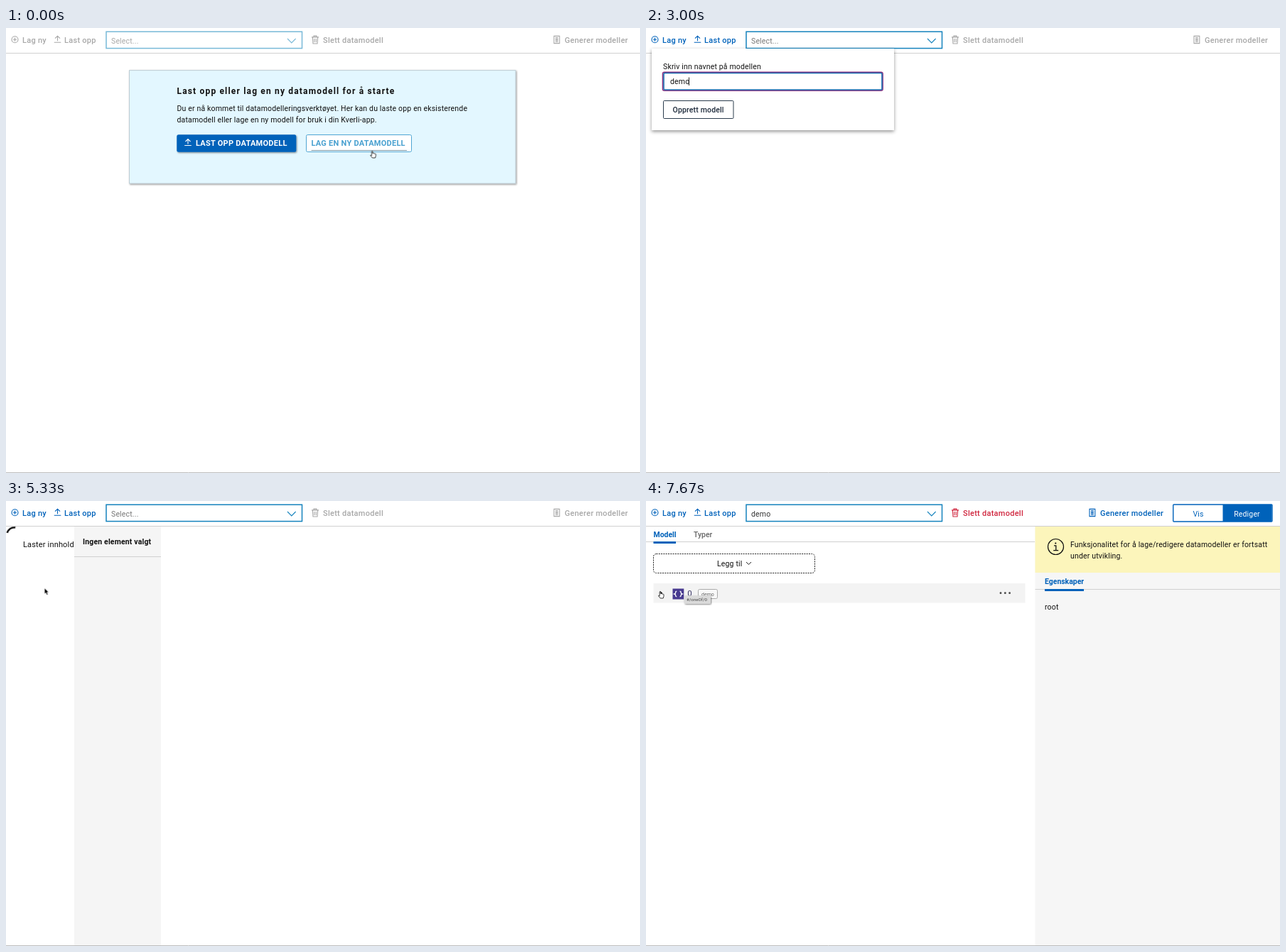
Animation, 892 px wide and 627 px high, one loop 8 s. Source, as an HTML page:

```html
<!DOCTYPE html>
<html lang="nb">
<head>
<meta charset="utf-8">
<title>Datamodellering</title>
<style>
  html, body { margin: 0; width: 100%; height: 100%; overflow: hidden; background: #fff; }
  svg { display: block; width: 100%; height: 100%; }
  text { font: 10.5px Roboto, sans-serif; letter-spacing: .16px; fill: #111; white-space: pre; }
  .bar text { font-size: 11px; font-weight: 500; letter-spacing: .26px; fill: currentColor; }
  .icon { fill: none; stroke: currentColor; stroke-width: 1.1; }
  .caps { font-size: 11px; font-weight: 700; letter-spacing: .25px; }
  .tab { font-weight: 700; letter-spacing: -.03px; }
  .blue { fill: #0062ba; }
  .white { fill: #fff; }
  .rule { stroke: #d0d0d0; }
  .mid { text-anchor: middle; }
  .cursor { opacity: 0; }
</style>
</head>
<body>
<svg viewBox="0 0 892 627">
  <defs>
    <filter id="soft" x="-10%" y="-10%" width="120%" height="130%">
      <feDropShadow dx="0" dy="2" stdDeviation="2.4" flood-opacity=".42"/>
    </filter>
    <filter id="edge" x="-5%" y="-5%" width="110%" height="125%">
      <feDropShadow dx="1" dy="1.2" stdDeviation=".8" flood-opacity=".45"/>
    </filter>
    <path id="upload" class="icon" d="M0 7.5V.8M-3.5 4L0 .6L3.5 4M-4.8 9.5H4.8"/>
  </defs>

  <path class="rule" d="M0 35.5H892"/>

  <g id="loading">
    <rect x="96" y="36" width="122" height="590" fill="#f5f5f5"/>
    <path class="rule" d="M96 78.5H218"/>
    <text x="24" y="64.5" style="font-size:11px">Laster innhold</text>
    <text x="108" y="60.5" style="font-weight:700">Ingen element valgt</text>
    <circle id="spinner" r="10.9" fill="none" stroke="#000" stroke-width="2.3"/>
  </g>

  <g id="editor">
    <path class="rule" d="M0 57.5H547"/>
    <text class="tab blue" x="10.5" y="50.5">Modell</text>
    <text class="tab" x="67" y="50.5" fill="#666" style="fill:#666;font-weight:500">Typer</text>
    <rect class="blue" x="10.5" y="57" width="31.5" height="3"/>
    <rect x="10.5" y="74.5" width="227" height="27" rx="4" fill="none" stroke="#222" stroke-dasharray="2 1.3"/>
    <text x="100" y="92">Legg til</text>
    <path d="M141 86l3.5 3.5L148 86" fill="none" stroke="#222"/>

    <rect x="10.5" y="116" width="523" height="27.5" fill="#f3f3f3"/>
    <path d="M19.7 126.8l3.6 2.9l-3.6 2.9z"/>
    <rect x="37.5" y="123.5" width="15.8" height="15" fill="#483a90"/>
    <path d="M43.2 127.3q-1.6 0-1.6 1.6t-1.6 2.1q1.6.5 1.6 2.1t1.6 1.6M47.6 127.3q1.6 0 1.6 1.6t1.6 2.1q-1.6.5-1.6 2.1t-1.6 1.6" fill="none" stroke="#fff" stroke-width="1.4"/>
    <text x="58.3" y="133.8" style="font-size:11.5px;fill:#3c3868">0</text>
    <rect x="73.5" y="124.5" width="27" height="13" rx="2" fill="#f8f8f8" stroke="#aaa"/>
    <text x="78" y="133.6" style="font-size:7px;letter-spacing:0;fill:#666">demo</text>
    <g fill="#444"><circle cx="499" cy="129.7" r="1.4"/><circle cx="505.3" cy="129.7" r="1.4"/><circle cx="511.6" cy="129.7" r="1.4"/></g>

    <rect x="547.5" y="36" width="344.5" height="590" fill="#f6f6f6"/>
    <rect x="547.5" y="36" width="344.5" height="65" fill="#fcf5bb"/>
    <circle cx="576.5" cy="64.5" r="11" fill="none" stroke="#111" stroke-width="1.2"/>
    <path d="M574 62.8h2.8v6.6M573.2 69.6h7" fill="none" stroke="#111" stroke-width="1.3"/>
    <circle cx="576.3" cy="59.5" r="1.1"/>
    <text x="597" y="64.5">Funksjonalitet for å lage/redigere datamodeller er fortsatt</text>
    <text x="597" y="81">under utvikling.</text>
    <path class="rule" d="M547.5 124.5H892"/>
    <text class="tab blue" x="561" y="117">Egenskaper</text>
    <rect class="blue" x="561" y="124" width="55" height="3"/>
    <text x="561" y="153">root</text>

    <rect x="741.7" y="5" width="139.3" height="24" rx="1" fill="#fff" stroke="#0062ba" stroke-width="1.4"/>
    <rect class="blue" x="811.5" y="5" width="69" height="24"/>
    <text class="mid blue" x="777" y="21.7">Vis</text>
    <text class="mid white" x="845.5" y="21.7">Rediger</text>
  </g>

  <g class="bar">
    <g id="create">
      <circle class="icon" cx="12.5" cy="16.3" r="4.5"/>
      <path class="icon" d="M10 16.3h5M12.5 13.8v5"/>
      <text x="23" y="20.6">Lag ny</text>
      <use href="#upload" x="72.5" y="10.7"/>
      <text x="82" y="20.6">Last opp</text>
    </g>
    <g id="remove">
      <path class="icon" d="M430 12.9h10M433 12.6v-1.5h4v1.5M431.3 13l.7 9h6l.7-9M433.8 15v5M436.2 15v5"/>
      <text x="446" y="20.6">Slett datamodell</text>
    </g>
    <g id="generate">
      <path class="icon" d="M771 11.4h7.8v10.2H771zM773 13.6h3.8M773 15.6h3.8M773 17.4h3.8M773 19.4h3.8"/>
      <text x="786" y="20.6">Generer modeller</text>
    </g>
  </g>

  <g id="select">
    <rect x="141" y="5.2" width="275.5" height="23.4" fill="#fff" stroke="currentColor" stroke-width="1.5"/>
    <path class="icon" d="M396 15l5.8 6l5.8-6"/>
    <text id="placeholder" x="148" y="22" style="fill:currentColor">Select...</text>
    <text id="chosen" x="148" y="22" style="fill:#333">demo</text>
  </g>

  <g id="dialog">
    <rect x="173.5" y="59.7" width="543.5" height="159.3" fill="#e3f7ff" stroke="#b4c3ca" stroke-width=".8" filter="url(#edge)"/>
    <text x="240.5" y="93" style="font-size:12px;font-weight:700;letter-spacing:1.17px">Last opp eller lag en ny datamodell for å starte</text>
    <text x="240.5" y="117">Du er nå kommet til datamodelleringsverktøyet. Her kan du laste opp en eksisterende</text>
    <text x="240.5" y="133.3">datamodell eller lage en ny modell for bruk i din Kverli-app.</text>
    <rect class="blue" x="240.3" y="150.2" width="168" height="24.6" rx="2.5" filter="url(#edge)"/>
    <use href="#upload" x="256" y="156" color="#fff"/>
    <text class="caps white" x="267" y="166">LAST OPP DATAMODELL</text>
    <rect x="422.5" y="150.5" width="148" height="24" rx="2" fill="#fff" stroke="#4fa5d3"/>
    <text class="caps" x="429.5" y="165.6" style="fill:#48a0d0">LAG EN NY DATAMODELL</text>
    <path d="M429.5 172.5H564" stroke="#7797a8"/>
  </g>

  <g id="popup">
    <rect x="8" y="29" width="341" height="115" fill="#fff" filter="url(#soft)"/>
    <text x="24" y="58.3">Skriv inn navnet på modellen</text>
    <rect id="ring" x="23.4" y="62.3" width="309.8" height="26" rx="2.5" fill="none" stroke="#8d2f7f" stroke-width="1.4"/>
    <rect id="field" x="25" y="63.5" width="307" height="23.5" rx="1.5" fill="#fff" stroke-width="1.6"/>
    <text id="hint" x="34" y="78.8" style="fill:#6c6c6c">Navn</text>
    <text id="typed" x="34" y="78.8">demo</text>
    <path id="caret" d="M.5 69.5v11.5" stroke="#111" stroke-width=".9"/>
    <rect id="submit" x="24.5" y="102.5" width="98.5" height="25" rx="1.2" stroke="#2b3c4d"/>
    <text x="37.5" y="119" style="font-weight:500;fill:#1e2b3c">Opprett modell</text>
  </g>

  <g id="tip">
    <rect x="53.5" y="133.2" width="37.5" height="11.5" rx="2" fill="#dadada" filter="url(#edge)"/>
    <text x="57" y="141.2" style="font-size:6.2px;letter-spacing:0;fill:#444">#/oneOf/0</text>
  </g>

  <path class="rule" d="M0 626.5H892" style="stroke:#bdbdbd"/>

  <path id="arrow" class="cursor" d="M0 0v8l1.8-1.6l1.4 3l1.5-.7l-1.4-2.9h2.4z" stroke="#fff" stroke-width=".5"/>
  <path id="hand" class="cursor" d="M2.2 5.8V1q.8-1 1.6 0v2.7q.9-.7 1.5.2q.9-.5 1.4.3q1-.3 1.3.6v2.4L7.2 10H3.2L.5 6.7q0-1.4 1.7 0z" fill="#fff" stroke="#222" stroke-width=".9"/>
  <path id="beam" class="cursor" d="M-1.8-4q1.8 0 1.8 1q0-1 1.8-1M0-3v6M-1.8 4q1.8 0 1.8-1q0 1 1.8 1" fill="none" stroke="#111" stroke-width=".9"/>
</svg>

<script>
const LOOP = 8000;

// Each step is [time in ms, value], held until the next one.
function hold(id, property, steps) {
  const frames = steps.map(([time, value]) =>
    ({ offset: time / LOOP, [property]: value, easing: 'step-end' }));
  frames.push({ ...frames[frames.length - 1], offset: 1 });
  document.getElementById(id).animate(frames, { duration: LOOP, iterations: Infinity });
}

const show = (id, ...steps) => hold(id, 'opacity', [[0, 0], ...steps]);
const during = (id, from, to) => show(id, [from, 1], [to, 0]);
const move = (x, y = 0) => `translate(${x}px, ${y}px)`;

const GREY = '#a8a8a8', BLUE = '#0062ba';

hold('dialog', 'opacity', [[0, 1], [330, 0]]);
show('popup', [670, .6], [1000, 1], [4330, 0]);
during('loading', 4330, 5670);
show('editor', [5670, 1]);
show('tip', [7330, .75], [7670, 1]);

hold('create', 'color', [[0, GREY], [330, BLUE]]);
hold('remove', 'color', [[0, GREY], [5670, '#d0273f']]);
hold('generate', 'color', [[0, GREY], [5670, BLUE]]);
hold('generate', 'transform', [[0, move(0)], [5670, move(-147)]]);

hold('select', 'color', [[0, '#78b9d8'], [670, '#1583bd']]);
hold('placeholder', 'fill', [[0, '#a8a8a8'], [670, '#777']]);
hold('placeholder', 'opacity', [[0, 1], [5670, 0]]);
show('chosen', [5670, 1]);

hold('field', 'stroke', [[0, '#2b3c4d'], [1330, '#1669ae']]);
during('ring', 1670, 4330);
hold('hint', 'opacity', [[0, 1], [2670, 0]]);
show('typed', [2670, 1]);
show('caret', [1670, 1], [2330, 0], [2670, 1], [3330, 0], [4000, 1]);
hold('caret', 'transform', [[0, move(34)], [2670, move(60)]]);
hold('submit', 'fill', [[0, '#fff'], [4000, '#e3f7ff']]);

const spins = [[4330, -90, 26], [4670, 30, 48], [5000, 150, 44], [5330, 197, 15]];
const spin = angle => `${move(12, 48)} rotate(${angle}deg)`;
hold('spinner', 'transform', [[0, spin(0)], ...spins.map(([t, angle]) => [t, spin(angle)])]);
hold('spinner', 'strokeDasharray', [[0, '26 100'], ...spins.map(([t, , arc]) => [t, `${arc} 100`])]);

const pointer = [
  [0, 'hand', 512.3, 173],
  [330, 'arrow', 498.5, 158.5],
  [1000, 'arrow', 206, 134],
  [1330, 'beam', 194.7, 83],
  [2670, 'none', 0, 0],
  [3330, 'beam', 171.5, 82],
  [3670, 'beam', 100, 81],
  [4000, 'hand', 51.3, 123],
  [4330, 'arrow', 54.3, 122.8],
  [5670, 'hand', 52.3, 123],
  [6000, 'hand', 17, 126],
  [6330, 'hand', 17, 127]
];
for (const kind of ['arrow', 'hand', 'beam']) {
  hold(kind, 'opacity', pointer.map(([t, k]) => [t, k === kind ? 1 : 0]));
  hold(kind, 'transform', pointer.map(([t, , x, y]) => [t, move(x, y)]));
}
</script>
</body>
</html>
```
